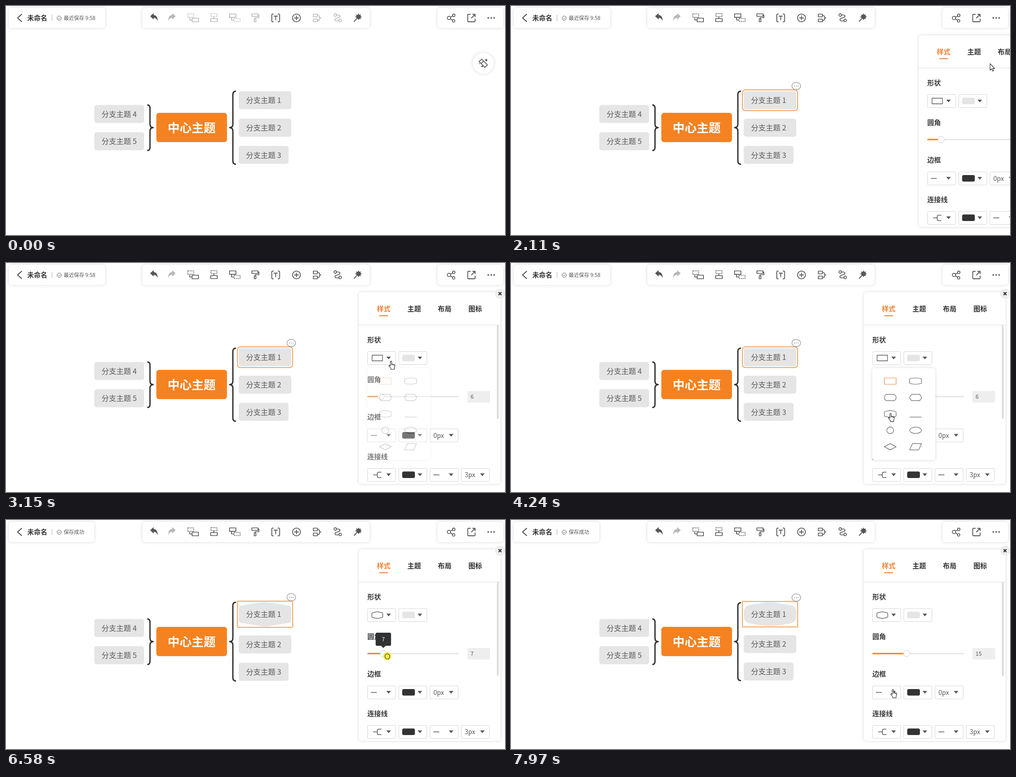
An HTML page that plays this animation: 1102x508 px, repeating every 8 s.

```html
<!DOCTYPE html>
<html lang="zh">
<head>
<meta charset="utf-8">
<style>
html, body { margin: 0; width: 100%; height: 100%; overflow: hidden; background: #fff; }
svg { display: block; width: 1102px; height: 508px; font-family: "Noto Sans CJK SC", "Noto Sans CJK", "Noto Sans", sans-serif; white-space: pre; }
.card { fill: #fff; filter: drop-shadow(0 0 3px rgba(0, 0, 0, .16)); }
</style>
</head>
<body>
<svg id="stage" viewBox="0 0 1102 508"></svg>
<script>
const LOOP = 8000, ORANGE = '#f58220', DARK = '#333', ICON = '#555', OFF = '#b8b8b8';
const stage = document.getElementById('stage');

// Active periods: start, end, number of picture steps
const beats = [[70, 870, 11], [940, 1080, 3], [1340, 2110, 12], [2180, 2940, 11], [3010, 3280, 5],
  [3750, 4370, 9], [4770, 5530, 11], [5600, 6370, 12], [6440, 7210, 12], [7480, 7970, 8]];
// Pointer path: time, x, y
const path = [[70, 1046, 492], [300, 872, 448], [840, 607, 217], [1340, 607, 217], [1900, 1054, 128],
  [2110, 1058, 128], [2180, 1058, 128], [2900, 850.5, 217.5], [3750, 850.5, 217.5], [4250, 838, 335],
  [4770, 838, 335], [5400, 993.5, 267], [5600, 993.5, 267], [6300, 838, 302], [6440, 838, 302],
  [7210, 883.7, 302], [7480, 883.7, 302], [7900, 843.5, 376]];
const looks = [[0, 'arrow'], [2880, 'hand'], [4900, 'arrow'], [6290, 'fist'], [7540, 'arrow'], [7890, 'hand']];
const presses = [[940, 1010], [1900, 1970], [3010, 3070], [4250, 4330], [5400, 5470], [6440, 7200]];

const clamp = p => Math.max(0, Math.min(1, p));
const ramp = (t, a, b) => clamp((t - a) / (b - a));
const smooth = p => p * p * (3 - 2 * p);

function snap(t) {
  const beat = beats.filter(b => b[0] <= t).pop();
  if (!beat) return 0;
  const [a, b, n] = beat, step = (b - a) / (n - 1);
  return Math.min(b, a + Math.floor((t - a) / step + 1e-6) * step);
}

const rect = (x, y, w, h, r, attrs) => `<rect x="${x}" y="${y}" width="${w}" height="${h}" rx="${r}" ${attrs}/>`;
const circle = (x, y, r, attrs) => `<circle cx="${x}" cy="${y}" r="${r}" ${attrs}/>`;
const fill = (d, c) => `<path d="${d}" fill="${c}"/>`;
const line = (d, c, w = 1.6, extra = '') =>
  `<path d="${d}" fill="none" stroke="${c}" stroke-width="${w}" stroke-linejoin="round" ${extra}/>`;
const text = (s, x, y, size, c = DARK, weight = 400, extra = '') =>
  `<text x="${x}" y="${y}" font-size="${size}" fill="${c}" font-weight="${weight}" ${extra}>${s}</text>`;
const group = (x, y, body, extra = '') => `<g transform="translate(${x} ${y})" ${extra}>${body}</g>`;
const box = (x, y, w, h) => `M${x} ${y}h${w}v${h}h${-w}z`;
const ring = (x, y, r) => `M${x - r} ${y}a${r} ${r} 0 1 0 ${2 * r} 0a${r} ${r} 0 1 0 ${-2 * r} 0`;
const DASH = 'stroke-dasharray="2.4 1.5"';

function roundPoly(pts, d) {
  const toward = ([x, y], [u, v]) => {
    const k = d / Math.hypot(u - x, v - y);
    return `${x + (u - x) * k} ${y + (v - y) * k}`;
  };
  return pts.map((p, i) => {
    const n = pts.length, prev = pts[(i + n - 1) % n], next = pts[(i + 1) % n];
    return `${i ? 'L' : 'M'}${toward(p, prev)}Q${p} ${toward(p, next)}`;
  }).join('') + 'Z';
}
// Six-sided shape: half width, half height at the sides, half height in the middle
const hexagon = (x, y, w, side, mid, round) => roundPoly([[x - w, y - side], [x, y - mid], [x + w, y - side],
  [x + w, y + side], [x, y + mid], [x - w, y + side]], round);

function header(saved) {
  return rect(6, 4, saved ? 189 : 213, 45, 6, 'class="card"') +
    line('M35 18L25.5 26.5 35 35', '#444', 1.8) +
    text('未命名', 47, 31.5, 14.7, DARK, 700) +
    line('M101.5 20V33', '#aaa', 1) +
    line(ring(117.5, 27, 4.7) + 'M115.2 27l1.7 1.8 3.2-3.4', ICON, 1) +
    text(saved ? '保存成功' : '最近保存 9:58', 127.5, 31, 11.3, ICON);
}

function toolbar(on) {
  const c = on ? ICON : OFF;
  const arrow = 'M318.3 22.8L326 15.8V20C331.5 20.5 335 24.5 335 33.5C333 28.5 330.5 26.3 326 26.2V30Z';
  let burst = '';
  for (let i = 0; i < 16; i++) {
    const r = i % 2 ? 4.6 : 7.6, a = i * Math.PI / 8;
    burst += `${i ? 'L' : 'M'}${778.5 + r * Math.cos(a)} ${24 + r * Math.sin(a)}`;
  }
  return rect(301, 4, 502, 45, 6, 'class="card"') +
    fill(arrow, ICON) + group(693, 0, `<g transform="scale(-1 1)">${fill(arrow, OFF)}</g>`) +
    line(box(401.5, 17.5, 13, 7.5), c, 1.5, DASH) + line('M406 26V31H411' + box(411, 27, 14, 8), c, 1.7) +
    line(box(452.5, 17, 13.5, 6.5), c, 1.5, DASH) + line('M459 24V28' + box(452, 28, 14.5, 6.5), c, 1.7) +
    line(box(493.7, 17.5, 14, 7.7) + 'M498 25V31H503', c, 1.7) + line(box(503.5, 27.5, 13.5, 7), c, 1.5, DASH) +
    line(box(543, 17.5, 13.5, 5.5) + 'M556.5 20H558.5V26H550V29' + box(548.3, 29, 3.6, 6), c, 1.7) +
    line('M591 17.8H589Q587 17.8 587 20V33Q587 35.2 589 35.2H591M600 17.8H602Q604.3 17.8 604.3 20V33Q604.3 35.2 602 35.2H600M591.3 22.5H600M595.6 22.5V31.5', ICON, 1.8) +
    line(ring(641.5, 26.5, 8.7) + 'M636.5 26.5H646.5M641.5 21.5V31.5', ICON, 1.8) +
    line(box(678.7, 18, 9, 6) + box(678.7, 29, 9, 6) + 'M688 20.5Q692 20.5 692 23.5T695.5 26.5Q692 26.5 692 29.5T688 32.5', c, 1.7) +
    line(ring(727, 20, 2.8) + ring(738, 32, 2.8) + 'M730 20H734C738 20 739 24 735 25.5L729 27.5C725 29 726 33 730 33H735', c, 1.7) +
    fill(burst + 'Z', ICON) + line('M768.5 34.5L774 29', ICON, 2);
}

function actions() {
  return rect(953, 4, 145, 45, 6, 'class="card"') +
    line(ring(978.3, 26.5, 3.7) + ring(988.8, 20.7, 2.8) + ring(988.5, 33, 2.8) + 'M981.6 24.7L986.4 22M981.6 28.5L986.2 31.5', ICON, 1.7) +
    line('M1026 18.5H1021Q1019.7 18.5 1019.7 20V33.5Q1019.7 35 1021 35H1034.5Q1036 35 1036 33.5V28M1027.5 27L1036 18.5M1030 18.5H1036V24.5', ICON, 1.8) +
    [1065, 1071.5, 1078].map(x => circle(x, 26.5, 1.8, `fill="${ICON}"`)).join('');
}

function magicButton() {
  const star = (x, y, r) => fill(`M${x} ${y - r}L${x + r * .35} ${y - r * .35} ${x + r} ${y} ${x + r * .35} ${y + r * .35} ${x} ${y + r} ${x - r * .35} ${y + r * .35} ${x - r} ${y} ${x - r * .35} ${y - r * .35}Z`, ICON);
  return circle(1054, 127, 23.5, 'class="card"') +
    group(1054, 127, `<g transform="rotate(45)">${line(box(-9, -4, 18, 8) + 'M-3 -4V4', ICON, 1.7)}</g>`) +
    star(1060.5, 120, 3.6) + star(1051.5, 134, 2.8) + circle(1045.3, 128, 1, `fill="${ICON}"`);
}

function node(x, cy, w, n) {
  return rect(x, cy - 20, w, 40, 5, 'fill="#e5e5e5"') + label(x, cy, n);
}
const label = (x, cy, n) => text('分支主题 ' + n, x + 16, cy + 6.2, 16.3, '#5a5a5a', 300);

function brace(end, spine, tip, top, mid, bottom) {
  return line(`M${end} ${top}Q${spine} ${top} ${spine} ${top + 7}V${mid - 8}Q${spine} ${mid} ${tip} ${mid}Q${spine} ${mid} ${spine} ${mid + 8}V${bottom - 7}Q${spine} ${bottom} ${end} ${bottom}`, DARK, 3);
}

function mindMap(t, hex, value) {
  const k = hex ? 1 - (value - 6) / 9 * .14 : 0;
  let s = brace(312, 318, 325, 219.5, 269.7, 320.5) + brace(508, 501, 494, 189 - 6.5 * k, 269.7, 351 + 6.2 * k) +
    rect(332, 237, 156, 65, 6, `fill="${ORANGE}"`) +
    text('中心主题', 410, 279.5, 26.5, '#fff', 700, 'text-anchor="middle"') +
    node(195, 239.5, 110, 4) + node(195, 300, 110, 5) +
    node(514, 270 + 6 * k, 116, 2) + node(514, 330.3 + 6.6 * k, 110, 3);
  if (hex) s += fill(hexagon(572, 209, 58, 18.5, 27.5, value), '#e5e5e5') + label(514, 209, 1);
  else s += node(514, 209, 116, 1);
  if (t < 800) return s;
  const top = 186 - 6.2 * k;
  return s + rect(511, top, 122, 2 * (209 - top), hex ? 1 : 7, `fill="none" stroke="#f8a35c" stroke-width="2" opacity="${t < 940 ? .5 : 1}"`) +
    group(630, 177.5 - 6.2 * k,
      `<ellipse rx="9.6" ry="8.2" fill="#fff" stroke="#aaa" stroke-width="1.7"/>` +
      fill('M-4 7L-1 10.5 3 7Z', '#aaa') + [-4, 0, 4].map(x => circle(x, 0, 1.1, 'fill="#999"')).join(''));
}

const caret = (x, y) => fill(`M${x - 5} ${y - 3}h10l-5 6z`, ICON);
const select = (x, y, body) =>
  rect(x + .5, y + .5, 62, 29, 2, 'fill="#fff" stroke="#d4d4d4"') + body + caret(x + 47, y + 14.7);
const swatch = (y, c) => select(867, y, rect(875, y + 7.5, 28, 14.5, 3.5, `fill="${c}"`));
const dash = (x, y) => select(x, y, line(`M${x + 8} ${y + 15}h13`, ICON, 1.5));
const amount = (x, y, s) => select(x, y, text(s, x + 8, y + 20, 14, ICON));

function panel(hex, value, menu, tip) {
  const knob = 798 + 202 * value / 40;
  const tabs = ['样式', '主题', '布局', '图标'];
  const rows = [['形状', 176], ['圆角', 263.5], ['边框', 347], ['连接线', 434.5]];
  return rect(779, 65, 313, 425, 6, 'class="card"') +
    tabs.map((s, i) => text(s, 819 + 67.4 * i, 107, 15, i ? DARK : '#ee8336', 700)).join('') +
    rect(824, 116, 20, 2, 1, 'fill="#ee8336"') + line('M779 137.5H1092', '#ddd', 1) +
    rect(1084, 138, 4, 208, 2, 'fill="#dcdcdc"') +
    circle(1091, 68, 11, 'fill="#eee"') + line('M1087.8 64.8l6.4 6.4m0-6.4l-6.4 6.4', '#222', 2) +
    rows.map(([s, y]) => text(s, 798, y, 15, '#3c3c3c', 700)).join('') +
    select(798, 196, line(hex ? hexagon(820, 211, 12, 5, 7.5, 2) : box(808.5, 204.5, 23, 12.5), ICON, 1.3)) + swatch(196, '#e5e5e5') +
    rect(798, 294.7, 202, 3, 1.5, 'fill="#e4e6ea"') + rect(798, 294.7, knob - 798, 3, 1.5, `fill="${ORANGE}"`) +
    circle(knob, 296.3, 7, 'fill="#fff" stroke="#ccc"') +
    rect(1019, 284, 50, 25.5, 2, 'fill="#eee"') + text(value, 1026, 301, 12, ICON) +
    dash(798, 367.5) + swatch(367.5, DARK) + amount(936, 367.5, '0px') +
    select(798, 455, line('M811 470H820M829 464H823Q820 464 820 467V473Q820 476 823 476H829', ICON, 1.5)) +
    swatch(455, DARK) + dash(936, 455) + amount(1005, 455, '3px') +
    (menu ? shapeMenu(hex, menu) : '') +
    (tip ? `<g opacity="${tip}">${rect(knob - 17, 250, 34, 29, 3, 'fill="#303133"')}${fill(`M${knob - 5} 279h10l-5 5z`, '#303133')}${text(value, knob, 268.5, 12, '#fff', 400, 'text-anchor="middle"')}</g>` : '');
}

function shapeMenu(hex, opacity) {
  const shapes = [
    box(-13, -7, 26, 14), 'M-13 -5Q0 -9 13 -5V5Q0 9 -13 5Z',
    'M-9 -7H9Q13 -4 13 0T9 7H-9Q-13 4 -13 0T-9 -7Z', 'M-9 -7H9L13 -1V1L9 7H-9L-13 1V-1Z',
    hexagon(0, 0, 13, 5.5, 7.5, 2), 'M-13 7H13',
    ring(0, 0, 7.5), 'M-13 0a13 7 0 1 0 26 0a13 7 0 1 0 -26 0',
    'M-13 0L0 -7 13 0 0 7Z', 'M-7 -7H13L7 7H-13Z'];
  return `<g opacity="${opacity}">` + rect(798, 233, 139, 204, 5, 'class="card"') +
    shapes.map((d, i) => group(i % 2 ? 893.5 : 837.5, 262 + 36.4 * (i >> 1),
      line(d, i === (hex ? 4 : 0) ? '#e58a45' : '#666', 1.2))).join('') + '</g>';
}

const pointers = {
  arrow: 'M0 0V14.5L3.3 11.4 5.5 16.5 7.9 15.5 5.7 10.6H10.3Z',
  hand: 'M-1.5 1.5A1.4 1.4 0 0 1 1.3 1.5V6.5L6 7.5Q8.7 8 8.4 11L7 15V18.5H-.5V16L-4.5 11.2Q-5.3 9 -3.3 9L-1.5 11Z',
  fist: 'M-5 -1Q-5 -3 -3.3 -3Q-3.3 -5 -1.5 -4.6Q0 -6 1.3 -4.5Q3.3 -5 3.5 -3.3Q5.3 -3.3 5.2 -1V2L3.7 6H-2.5L-5 2Z'
};

function pointer(t) {
  if (t < 70) return '';
  const i = path.filter(p => p[0] <= t).length - 1, a = path[i], b = path[i + 1] || a;
  const p = smooth(ramp(t, a[0], b[0] + (a === b)));
  const look = looks.filter(l => l[0] <= t).pop()[1];
  const down = presses.some(([s, e]) => t >= s && t < e);
  return group(a[1] + (b[1] - a[1]) * p, a[2] + (b[2] - a[2]) * p,
    (down ? circle(0, 0, 9.3, 'fill="#fdf04a"') : '') +
    `<path d="${pointers[look]}" fill="${look === 'fist' && down ? '#fdf04a' : '#fff'}" stroke="#222" stroke-width="1.1" stroke-linejoin="round"/>` +
    (look === 'hand' ? line('M1.3 6.5V9.5M3.8 7.2V9.7M6 7.8V10', '#222', .9) : ''));
}

function scene(t) {
  const hex = t >= 4290, value = Math.round(6 + 9 * smooth(ramp(t, 6440, 7210)));
  const menu = ramp(t, 3010, 3280) ** 1.6 * (1 - ramp(t, 5470, 5730));
  const tip = ramp(t, 6220, 6370) * (1 - ramp(t, 7480, 7680));
  const slide = 323 * (1 - ramp(t, 2000, 2284)) ** 2;
  return header(t >= 4840) + toolbar(t >= 940) + actions() + mindMap(t, hex, value) +
    (t > 2000 ? group(slide, 0, panel(hex, value, menu, tip)) : magicButton()) + pointer(t);
}

let shown = -1;
const start = performance.now();
function tick() {
  const t = snap((performance.now() - start) % LOOP);
  if (t !== shown) stage.innerHTML = scene(shown = t);
  requestAnimationFrame(tick);
}
tick();
</script>
</body>
</html>
```
